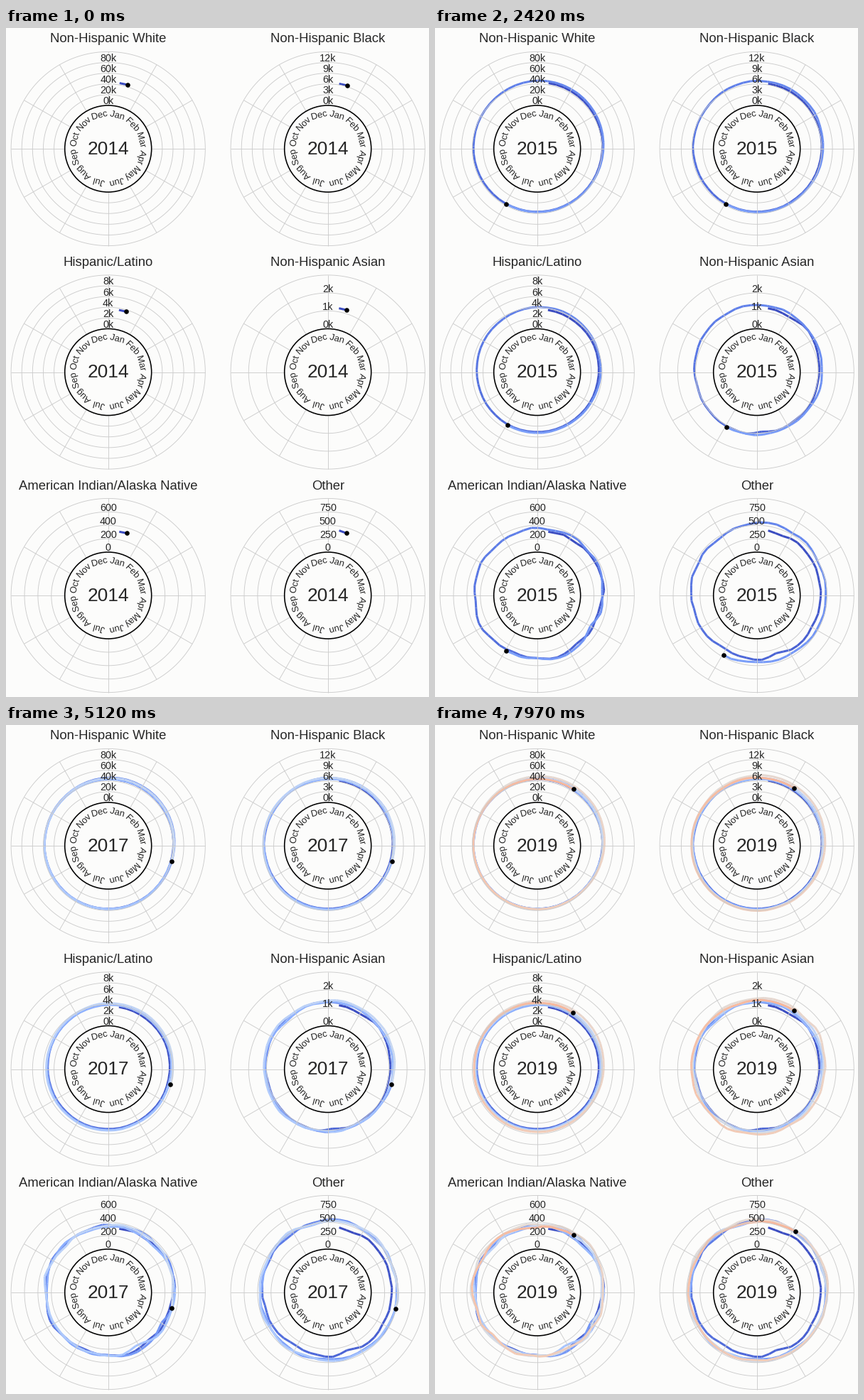
Animation of 595x942 px, one loop 8000 ms. Source, as a matplotlib script:

```python
import numpy as np
import matplotlib.pyplot as plt
from matplotlib.animation import FuncAnimation
from matplotlib.collections import LineCollection
from matplotlib.patches import Circle, PathPatch
from matplotlib.path import Path
from matplotlib.textpath import TextPath
from matplotlib.transforms import Affine2D

plt.rcParams["font.family"] = "Liberation Sans"

W, H, DPI = 595, 942, 64
PX = 72 / DPI                      # points per pixel
WEEKS = 264                        # weeks shown in one loop
TICK, LOOP = 20, 8000              # ms
SPAN = 390                         # weeks covered by the colour scale
R0, R1 = 61, 136.6                 # inner and outer radius
BG, INK, GRID = "#fcfcfb", "#262626", "#cccccc"
MONTHS = "Jan Feb Mar Apr May Jun Jul Aug Sep Oct Nov Dec".split()
YEAR_STARTS = [365, 730, 1096, 1461, 1826]
WINTERS = np.array([5, 7.5, 5, 6.5, 9.5, 5])   # height of each winter peak
PEAK = 0.08                        # time of the peak, in years

# title, tick labels, rings, low radius, yearly rise, winter scale, jitter, early dip
PANELS = [
    ("Non-Hispanic White", "0k 20k 40k 60k 80k", 5, 89, 0.1, 1, 0.15, 0),
    ("Non-Hispanic Black", "0k 3k 6k 9k 12k", 5, 88.5, 0.65, 0.95, 0.3, 0),
    ("Hispanic/Latino", "0k 2k 4k 6k 8k", 5, 83.9, 1.05, 1, 0.25, 0),
    ("Non-Hispanic Asian", "0k 1k 2k", 3, 85.8, 1.3, 1.05, 1.1, 0),
    ("American Indian/Alaska Native", "0 200 400 600", 4, 88, 0.4, 1, 2.1, 0),
    ("Other", "0 250 500 750", 4, 94.7, 0.3, 0.85, 1.6, 6),
]

rng = np.random.default_rng(11)
days = 10 + 7 * np.arange(WEEKS + 1)
angles = days * 360 / 365


def radii(low, rise, scale, jitter, dip):
    """Slow rise plus a winter peak each year, with smoothed weekly noise."""
    t = days / 365
    phase = t - PEAK
    season = ((1 + np.cos(2 * np.pi * phase)) / 2) ** 2
    height = scale * WINTERS[np.rint(phase).astype(int)]
    noise = np.convolve(rng.normal(0, jitter, t.size), [0.3, 0.6, 0.3], "same")
    early = dip / (1 + np.exp((t - 0.78) / 0.07))
    return low + rise * t + height * season + noise - early


def polar(deg, r, cx, cy):
    a = np.radians(deg)
    return np.column_stack([cx + r * np.sin(a), cy - r * np.cos(a)])


def month_ring():
    parts = []
    for k, name in enumerate(MONTHS):
        glyphs = TextPath((0, 0), name, size=12.9)
        x = glyphs.vertices[:, 0]
        place = (Affine2D().translate(-(x.min() + x.max()) / 2, 45)
                 .rotate_deg(-15 - 30 * k).scale(1, -1))
        parts.append(place.transform_path(glyphs))
    return Path.make_compound_path(*parts)


fig = plt.figure(figsize=(W / DPI, H / DPI), dpi=DPI, facecolor=BG)
ax = fig.add_axes([0, 0, 1, 1])
ax.set(xlim=(0, W), ylim=(H, 0))
ax.axis("off")


def label(x, y, s, size):
    return ax.text(x, y, s, fontsize=size * PX, color=INK, ha="center",
                   va="baseline", zorder=4)


ring_text = month_ring()
colors = plt.get_cmap("coolwarm")(np.arange(WEEKS) / SPAN)
sweep = np.linspace(0, 360, 181)
grid, trails, years = [], [], []

for n, (title, ticks, rings, *shape) in enumerate(PANELS):
    cx, cy = 143.7 + 309 * (n % 2), 170 + 314.5 * (n // 2)
    step = (R1 - R0) / rings
    grid += [polar(sweep, R0 + step * k, cx, cy) for k in range(1, rings + 1)]
    grid += [polar(np.full(2, d), np.array([R0, R1]), cx, cy)
             for d in range(0, 360, 30)]
    ax.add_patch(Circle((cx, cy), R0, fill=False, ec="black", lw=1.6 * PX,
                        zorder=3))
    ax.add_patch(PathPatch(Affine2D().translate(cx, cy).transform_path(ring_text),
                           fc=INK, lw=0, zorder=4))
    label(cx, cy - 149.5, title, 18.5)
    for k, s in enumerate(ticks.split()):
        label(cx, cy - R0 - step * k - 1.6, s, 14.4)
    years.append(label(cx, cy + 8, "2014", 26.2))

    points = polar(angles, radii(*shape), cx, cy)
    segments = np.stack([points[:-1], points[1:]], axis=1)
    trail = LineCollection([], colors=colors, linewidths=3 * PX, zorder=1)
    ax.add_collection(trail, autolim=False)
    trails.append((trail, segments))

ax.add_collection(LineCollection(grid, colors=GRID, linewidths=0.9 * PX,
                                 zorder=1.5), autolim=False)
dots, = ax.plot([], [], "o", color="black", ms=6.6 * PX, mew=0, zorder=5)


def draw(k):
    week = (2 * k + 1) * TICK * WEEKS // (2 * LOOP)
    year = 2014 + sum(days[week + 1] >= d for d in YEAR_STARTS)
    heads = []
    for (trail, segments), text in zip(trails, years):
        trail.set_segments(segments[:week + 1])
        text.set_text(str(year))
        heads.append(segments[week, 1])
    dots.set_data(*np.array(heads).T)
    return [t for t, _ in trails] + years + [dots]


anim = FuncAnimation(fig, draw, frames=LOOP // TICK, interval=TICK,
                     init_func=lambda: draw(0), repeat=True, repeat_delay=0)
plt.show()
```
